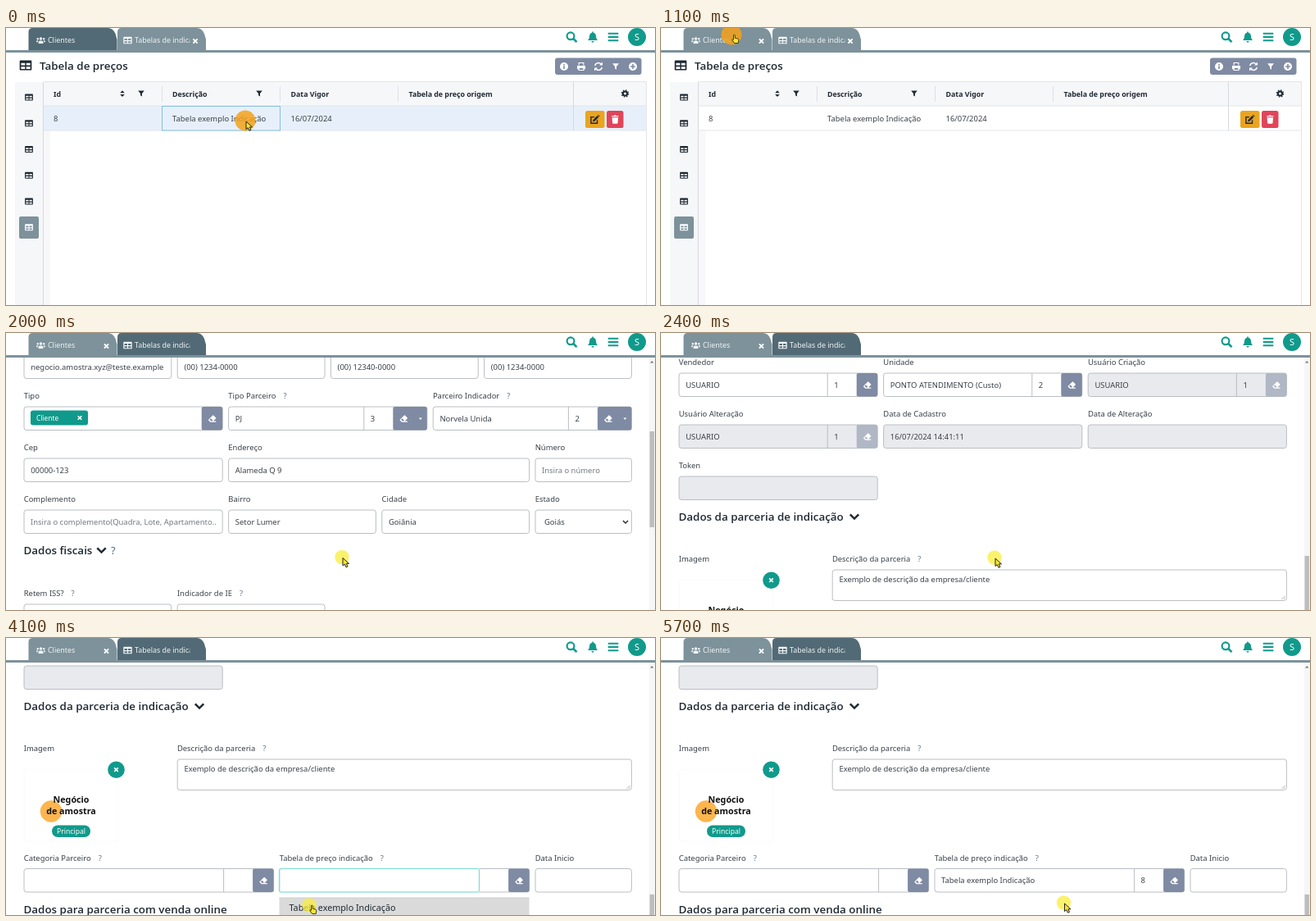
These frames come from a looping animation (792x338 px, 6.2 s). An HTML page:

```html
<!DOCTYPE html>
<html lang="pt-BR">
<head>
<meta charset="utf-8">
<title>Tabela de preços</title>
<style>
html, body { margin: 0; width: 100%; height: 100%; overflow: hidden; background: #fff; }
svg { display: block; }
text { font-family: "Noto Sans", "Open Sans", sans-serif; font-size: 9.45px; fill: #3a4149; white-space: pre; }
text.head { font-family: "Open Sans", "Noto Sans", sans-serif; font-size: 13.4px; font-weight: 600; fill: #1f2933; }
</style>
</head>
<body>
<svg id="stage" width="792" height="338" viewBox="0 0 792 338"></svg>
<script>
const TEAL = '#109a8b', STEEL = '#7d929b', DARK = '#526a75', BTN = '#7f8aa3', INK = '#1f2933';
const LOOP = 6200, STEP = 100;

const icons = {
  table: 'M-5-5h10q1 0 1 1v8q0 1-1 1h-10q-1 0-1-1v-8q0-1 1-1zM-4.6-2.2h4v2.3h-4zM.6-2.2h4v2.3h-4zM-4.6 1.4h4v2.2h-4zM.6 1.4h4v2.2h-4z',
  users: 'M-2-2.4a2 2 0 1 1 4 0a2 2 0 1 1-4 0zM-3.4 4.5v-1.7q0-2.3 2.4-2.3h2q2.4 0 2.4 2.3v1.7zM-5.7-2a1.4 1.4 0 1 1 2.8 0a1.4 1.4 0 1 1-2.8 0zM2.9-2a1.4 1.4 0 1 1 2.8 0a1.4 1.4 0 1 1-2.8 0zM-6.2 2.7v-1.2q0-1.3 1.4-1.3h1.2q-.8 1-.8 2.5zM6.2 2.7v-1.2q0-1.3-1.4-1.3h-1.2q.8 1 .8 2.5z',
  eraser: 'M-4.6 1.2l5-5q.7-.7 1.4 0l2.5 2.5q.7.7 0 1.4l-3 3h3.3v1.1h-7l-2.2-2.1q-.5-.5 0-.9zM-3.3 1.3l1.8 1.8h1.3l.9-.9l-2.4-2.4z',
  funnel: 'M-4-3.8h8l-3 3.8v3.7l-2-1.4v-2.3z',
  sort: 'M-2.8-.8l2.8-3l2.8 3zM-2.8.9l2.8 3l2.8-3z',
  caret: 'M-2-1h4l-2 2.4z',
  bell: 'M-6 4q2-2 2-5q0-3.5 3.2-4.2v-1.2h1.6v1.2q3.2.7 3.2 4.2q0 3 2 5zM-1.6 5h3.2q-.2 1.7-1.6 1.7t-1.6-1.7z',
  bars: 'M-6.3-5.2h12.6v2h-12.6zM-6.3-1h12.6v2h-12.6zM-6.3 3.2h12.6v2h-12.6z',
  trash: 'M-4.5-4.6h3l.6-.8h1.8l.6.8h3v1.3h-9zM-3.9-2.5h7.8l-.5 7q-.1 1-1 1h-4.8q-.9 0-1-1z',
  edit: 'M-5.5-3.8h5.4l-1.4 1.4h-2.6v6.2h6.2v-2.5l1.4-1.4v5.4h-9zM-2.6 2.5l.4-2.3l5-5l1.9 1.9l-5 5zM3.4-5.3l.7-.6l1.9 1.9l-.7.6z',
  print: 'M-3.4-5h6.8v3.4h-6.8zM-2.3-4v2.4h4.6v-2.4zM-5-1h10v4.2h-1.6v1.8h-6.8v-1.8h-1.6zM-2.3 2v2h4.6v-2z',
  info: 'M-5 0a5 5 0 1 1 10 0a5 5 0 1 1-10 0zM-.8-3.1h1.6v1.6h-1.6zM-.8-.8h1.6v3.7h-1.6z',
  plus: 'M-5 0a5 5 0 1 1 10 0a5 5 0 1 1-10 0zM-.8-2.9v2.1h-2.1v1.6h2.1v2.1h1.6v-2.1h2.1v-1.6h-2.1v-2.1z'
};

const ic = (name, x, y, fill, s = 1) =>
  `<path transform="translate(${x} ${y}) scale(${s})" d="${icons[name]}" fill="${fill}" fill-rule="evenodd"/>`;
const line = (d, color, w = 1) => `<path d="${d}" fill="none" stroke="${color}" stroke-width="${w}"/>`;
const box = (x, y, w, h, fill, r = 0, extra = '') =>
  `<rect x="${x}" y="${y}" width="${w}" height="${h}" rx="${r}" fill="${fill}" ${extra}/>`;
const txt = (x, y, s, attr = '') => `<text x="${x}" y="${y}" ${attr}>${s}</text>`;
const css = (size, fill = INK, weight = 400) => `style="font-size:${size}px;fill:${fill};font-weight:${weight}"`;
const cross = (x, y, r = 2.5, w = 1.8) => line(`M${x - r} ${y - r}l${2 * r} ${2 * r}m0 ${-2 * r}l${-2 * r} ${2 * r}`, '#fff', w);
const chevron = (x, y, r = 5, w = 2.2, color = INK) => line(`M${x - r} ${y - r / 2}l${r} ${r}l${r} ${-r}`, color, w);
const group = (id, s) => `<g id="${id}">${s}</g>`;

// Form pieces sit on a twelve column grid.
const colX = c => 22 + 62.4 * c;

function field(c, n, y, label, o = {}) {
  const x = colX(c), w = 62.4 * n - 7.4, top = y + 13, h = o.h || 28.5, base = y + 30.8;
  const bw = o.btn ? (o.menu ? 41.5 : 25.5) : 0, split = x + w - bw - 35.5;
  const help = o.help ? '<tspan dx="9" fill="#64748b">?</tspan>' : '';
  let s = txt(x - .3, y + 3.3, label + help);
  s += box(x, top, w, h, o.off ? '#e9eaee' : '#fff', 3, 'stroke="#b3b7bd" stroke-width=".9"');
  if (o.btn) {
    s += box(x + w - bw, top, bw, h, o.off ? '#b0b7c5' : BTN, 2);
    s += ic('eraser', x + w - bw + 13, top + 14.5, '#fff');
    if (o.menu) s += ic('caret', x + w - 8, top + 14.5, '#fff');
    if (o.btn === 2) s += line(`M${split} ${top}v${h}`, '#b3b7bd', .9);
  }
  if (o.v) s += `<svg x="${x}" y="${top}" width="${w - 8}" height="${h}">${txt(8.2, o.h ? 14.9 : 17.8, o.v)}</svg>`;
  if (o.ph) s += txt(x + 8, base, o.ph, 'style="fill:#727a83"');
  if (o.code) s += txt(split + 8, base, o.code);
  return s;
}

const head = (y, s, arrow, help) =>
  txt(21.5, y + 5, s, 'class="head"') +
  (arrow ? chevron(arrow, y, 5.2, 2.5) : '') +
  (help ? txt(help, y + 4.8, '?', css(13, '#4a6b8a', 500)) : '');

function form() {
  const off = { off: 1 }, user = { v: 'USUARIO', code: '1', btn: 2 };
  return [
    head(-228, 'Dados gerais', 0),
    field(0, 6, -175, 'Nome'), field(6, 6, -175, 'Apelido'),
    field(0, 4, -112, 'Documento'), field(4, 4, -112, 'Registro'), field(8, 4, -112, 'Data'),
    field(0, 6, -49, 'Contato'), field(6, 6, -49, 'Site'),
    field(0, 3, 14, 'Email', { v: 'negocio.amostra.xyz@teste.example' }),
    field(3, 3, 14, 'Telefone', { v: '(00) 1234-0000' }),
    field(6, 3, 14, 'Celular', { v: '(00) 12340-0000' }),
    field(9, 3, 14, 'Outro', { v: '(00) 1234-0000' }),
    field(0, 4, 77, 'Tipo', { btn: 1 }),
    box(30, 94.5, 70, 18, TEAL, 3), txt(37, 106.7, 'Cliente', css(8.4, '#fff')), cross(90, 103.5, 2.3, 1.6),
    field(4, 4, 77, 'Tipo Parceiro', { v: 'PJ', code: '3', btn: 2, menu: 1, help: 1 }),
    field(8, 4, 77, 'Parceiro Indicador', { v: 'Norvela Unida', code: '2', btn: 2, menu: 1, help: 1 }),
    field(0, 4, 140, 'Cep', { v: '00000-123' }),
    field(4, 6, 140, 'Endereço', { v: 'Alameda Q 9' }),
    field(10, 2, 140, 'Número', { ph: 'Insira o número' }),
    field(0, 4, 203, 'Complemento', { ph: 'Insira o complemento(Quadra, Lote, Apartamento..' }),
    field(4, 3, 203, 'Bairro', { v: 'Setor Lumer' }),
    field(7, 3, 203, 'Cidade', { v: 'Goiânia' }),
    field(10, 2, 203, 'Estado'), txt(657, 233.8, 'Goiás'), chevron(756, 230.5, 3, 1.4),
    head(265, 'Dados fiscais', 116.5, 128),
    field(0, 3, 318, 'Retem ISS?', { help: 1 }), field(3, 3, 318, 'Indicador de IE', { help: 1 }),
    head(380, 'Dados adicionais', 0),
    field(0, 12, 433, 'Observação'),
    field(0, 4, 496, 'Situação'), field(4, 4, 496, 'Origem'), field(8, 4, 496, 'Grupo'),
    field(0, 4, 559, 'Vendedor', user),
    field(4, 4, 559, 'Unidade', { v: 'PONTO ATENDIMENTO (Custo)', code: '2', btn: 2 }),
    field(8, 4, 559, 'Usuário Criação', { ...user, ...off }),
    field(0, 4, 622, 'Usuário Alteração', { ...user, ...off }),
    field(4, 4, 622, 'Data de Cadastro', { v: '16/07/2024 14:41:11', off: 1 }),
    field(8, 4, 622, 'Data de Alteração', off),
    field(0, 4, 685, 'Token', off),
    head(747, 'Dados da parceria de indicação', 236),
    txt(21.7, 802.3, 'Imagem'),
    box(22, 824, 115, 88, '#fff', 2, 'stroke="#fafafa"'),
    `<circle cx="134.5" cy="824.7" r="10.3" fill="${TEAL}"/>`, cross(134.5, 824.7, 2.3, 1.7),
    '<circle cx="55" cy="875.5" r="13.2" fill="#fdb54e"/>',
    txt(79.5, 865, 'Negócio', 'text-anchor="middle" ' + css(10.7, '#111', 700)),
    txt(79.5, 879.3, 'de amostra', 'text-anchor="middle" ' + css(10.7, '#111', 700)),
    box(56, 892.5, 47, 14.5, TEAL, 7.2), txt(79.5, 903, 'Principal', 'text-anchor="middle" ' + css(8.6, '#fff')),
    field(3, 9, 799, 'Descrição da parceria', { v: 'Exemplo de descrição da empresa/cliente', h: 37.5, help: 1 }),
    line('M757.5 848l4-4m-1.5 4l1.5-1.5', '#8c9197', .7),
    field(0, 5, 932.5, 'Categoria Parceiro', { btn: 2, help: 1 }),
    field(5, 5, 932.5, 'Tabela de preço indicação', { btn: 2, help: 1 }),
    field(10, 2, 932.5, 'Data Inicio'),
    group('value', txt(342, 963.3, 'Tabela exemplo Indicação') + txt(585.5, 963.3, '8')),
    group('focus', box(333.5, 945.5, 244, 28.5, 'none', 2, 'stroke="#dcf6f4" stroke-width="2.2"') +
      box(333.5, 945.5, 244, 28.5, 'none', 2, 'stroke="#86dcd7"')),
    head(995, 'Dados para parceria com venda online', 0),
    group('menu', box(333.5, 981, 305, 27, '#dadada') + line('M333.5 981h305', '#cfcfcf') +
      txt(345.5, 997, 'Tabela exemplo Indicação', css(10.74)))
  ].join('');
}

function list() {
  const bold = (x, s) => txt(x, 83.7, s, css(8.8, INK, 600));
  const tools = ['info', 'print', '', 'funnel', 'plus'];
  let s = ic('table', 24, 45.5, INK, 1.22) + txt(41, 50.5, 'Tabela de preços', 'class="head"');
  s += box(670, 36.5, 105.5, 20.5, BTN, 3);
  s += tools.map((n, i) => n ? ic(n, 681 + 21 * i, 47, '#fff') : '').join('');
  s += line('M718.6 46a4.3 4.3 0 0 1 7.6-1.7M727.4 48a4.3 4.3 0 0 1-7.6 1.7', '#fff', 1.5) +
    '<path d="M728 41.5v4h-4zM718 52.5v-4h4z" fill="#fff"/>';
  s += box(11, 66, 34, 272, '#f6f7f9') + box(46, 66, 8, 272, '#f8f8fa') + box(16, 230, 24, 27, STEEL, 2);
  for (let i = 0; i < 6; i++) s += ic('table', 28, 84.5 + 31.75 * i, i < 5 ? INK : '#fff', .82);
  s += box(46, 66, 735, 29, '#f6f7f9') + box(46, 95, 735, 30, '#fff');
  s += group('hover', box(46, 95, 735, 30, '#e7f0fa'));
  s += line('M46 65.5h735.5V338M46 95h735M46 125h735', '#e0e3e7', .9) + line('M45.5 66V338', '#d5d9de');
  s += line('M190.5 71v19M334.5 71v19M478.5 71v19', '#dde0e4') + line('M692.5 66v59', '#d5d9de');
  s += group('cell', box(190.5, 95.5, 144, 29.5, 'none', 0, 'stroke="#86bfe0"'));
  s += bold(58, 'Id') + bold(203, 'Descrição') + bold(347.5, 'Data Vigor') + bold(491.5, 'Tabela de preço origem');
  s += ic('sort', 142, 80, INK) + ic('funnel', 165, 80, INK, .95) + ic('funnel', 309, 80, INK, .95);
  s += `<circle cx="755.5" cy="80" r="2.6" fill="none" stroke="${INK}" stroke-width="2"/>
    <circle cx="755.5" cy="80" r="4" fill="none" stroke="${INK}" stroke-width="1.5" stroke-dasharray="1.57"/>`;
  s += txt(58, 113.7, '8') + txt(203, 113.7, 'Tabela exemplo Indicação') + txt(347.5, 113.7, '16/07/2024');
  s += box(707, 101, 23.5, 21, '#eba41f', 2.5) + ic('edit', 718.7, 111.7, INK);
  return s + box(733, 101, 20.5, 21, '#e0455a', 2.5) + ic('trash', 743.3, 111.5, '#fff', .95);
}

function tab(x, id, icon, label, pad) {
  return `<path id="${id}" d="M${x} 28V5q0-5 5-5h92q6 0 9 7l2 7V28z"/>` +
    ic(icon, x + pad - 8.5, 15, '#f4f7f8', .87) +
    `<svg x="${x + pad}" y="0" width="${88.5 - pad}" height="27">${txt(0, 18.2, label, css(8.9, '#f0f4f5'))}</svg>` +
    group(id + 'X', cross(x + 95, 16, 2.6, 1.9));
}

const header = box(0, 0, 792, 28, '#fff') +
  tab(27.5, 'tabA', 'users', 'Clientes', 23.5) + tab(136, 'tabB', 'table', 'Tabelas de indicação', 21) +
  box(0, 27, 792, 3, STEEL) +
  `<circle cx="689" cy="9.8" r="4.4" fill="none" stroke="${TEAL}" stroke-width="2.2"/>` +
  line('M692.3 13l4.2 4.2', TEAL, 2.6) + ic('bell', 716, 11, TEAL) + ic('bars', 741, 11, TEAL) +
  `<circle cx="770" cy="11" r="11" fill="${TEAL}"/>` +
  txt(770, 15, 'S', 'text-anchor="middle" ' + css(11, '#fff'));

const scrollbar = box(784.5, 30, 7.5, 308, '#f6f6f6') +
  '<path d="M786 36.5h4.4l-2.2-2.6z" fill="#777"/>' + box(785.5, 0, 5.5, 117, '#bdbdbd', 0, 'id="thumb"');

const pointer = `<circle id="halo"/>
  <path id="arrow" d="M1 1v9.6l2.3-2l1.7 3.7l2-.9l-1.7-3.5h3.2z" fill="#ffe62e" stroke="#222" stroke-width="1"/>
  <path id="hand" d="M2.5.5q1-.9 1.8.2v3.6l3.6.9q1 .4.9 1.5l-.6 3.8h-4.6l-3-4.2q.3-1.2 1.9 0z" fill="#ffe62e" stroke="#332b10" stroke-width=".9"/>
  <path id="beam" d="M6.5 5h5.4M9.2 5v10M6.5 15h5.4" fill="none" stroke="#3c3c20" stroke-width="1.6"/>`;

document.getElementById('stage').innerHTML =
  group('list', list()) + group('client', group('form', form()) + scrollbar) + header + group('pointer', pointer);

const el = {};
document.querySelectorAll('[id]').forEach(e => el[e.id] = e);
const show = (id, on) => el[id].setAttribute('visibility', on ? 'inherit' : 'hidden');
const set = (id, attrs) => Object.entries(attrs).forEach(([k, v]) => el[id].setAttribute(k, v));

const path = [[0, 292, 113], [100, 292, 113], [800, 86, 8], [1200, 86, 8], [1700, 410, 274], [2000, 410, 273.5],
  [2400, 407, 274], [2600, 407, 274], [3000, 398, 292], [3400, 398, 292], [4000, 370, 326], [4600, 370, 326],
  [5000, 491.5, 323]];
const scroll = [[1750, -283], [2000, 0], [2400, 523], [2600, 664]];
const clicks = [[0, 200], [1100, 1300], [3200, 3400], [4400, 4600]];
const smooth = u => u * u * (3 - 2 * u);

function at(keys, t, ease = u => u) {
  const i = keys.findIndex(k => k[0] > t);
  if (i === 0) return keys[0].slice(1);
  if (i < 0) return keys[keys.length - 1].slice(1);
  const a = keys[i - 1], b = keys[i], u = ease((t - a[0]) / (b[0] - a[0]));
  return a.slice(1).map((v, j) => v + (b[j + 1] - v) * u);
}

function draw(t) {
  const [x, y] = at(path, t, smooth), [offset] = at(scroll, t);
  const onForm = t >= 1200, inRow = !onForm && y > 95, onTab = y < 27 && x > 27 && x < 135;
  const open = t >= 3500 && t < 4700, pressed = clicks.some(([a, b]) => t >= a && t < b);

  show('list', !onForm);
  show('client', onForm);
  show('hover', inRow);
  show('cell', inRow);
  show('tabAX', onForm || onTab);
  show('tabBX', !onForm);
  set('tabA', { fill: onForm || onTab ? STEEL : DARK });
  set('tabB', { fill: onForm ? DARK : STEEL });

  set('form', { transform: `translate(0 ${-offset})` });
  set('thumb', { y: 120 + offset * .2905 });
  show('focus', t >= 3200 && t < 4700);
  show('menu', open);
  show('value', t >= 4800);

  const beam = onForm && t > 2600 && y > 281 && y < 310;
  const hand = onTab || (open && y > 317);
  set('pointer', { transform: `translate(${x} ${y})` });
  set('halo', { r: pressed ? 12.5 : 8.7, fill: pressed ? '#f5a11a' : '#f8ee3c', opacity: pressed ? .85 : .75 });
  show('beam', beam);
  show('hand', hand);
  show('arrow', !beam && !hand);
}

const start = performance.now();
function tick() {
  const t = (performance.now() - start) % LOOP;
  draw(Math.floor(t / STEP) * STEP);
  requestAnimationFrame(tick);
}
tick();
</script>
</body>
</html>
```
